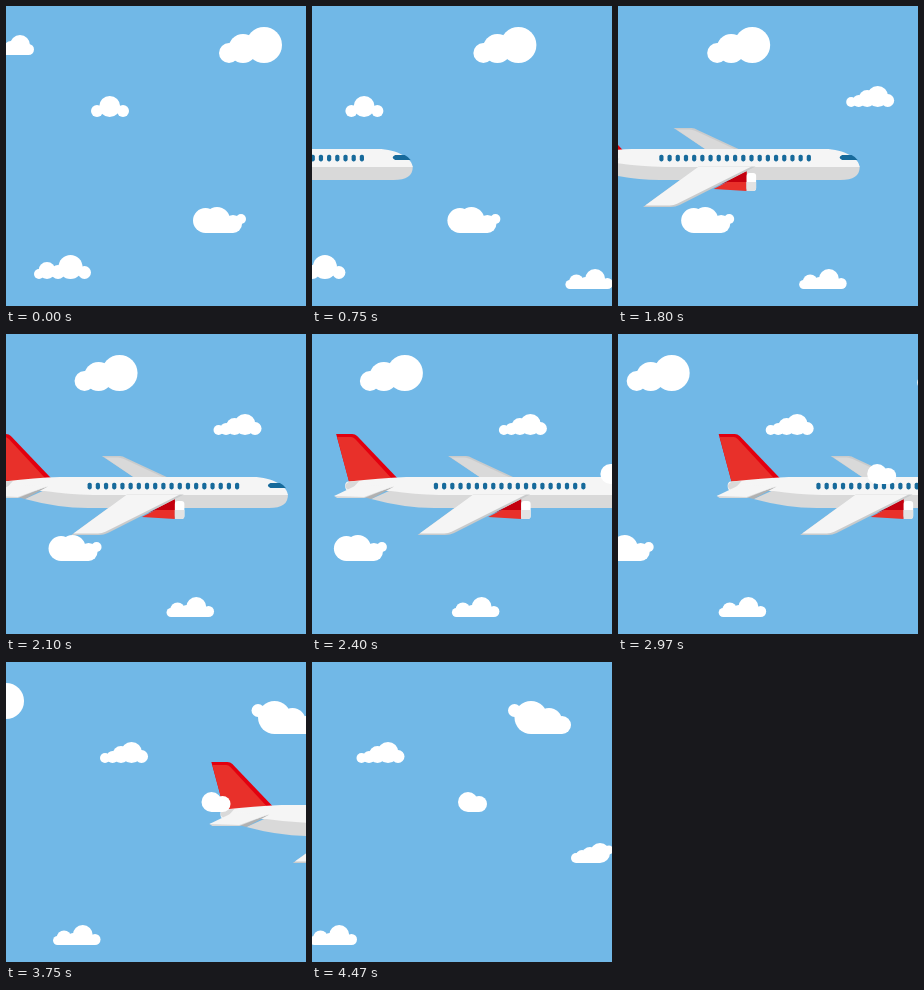
Recreate the animation shown at these times as an HTML page. Size 300x300 px, loop 4.5 s.

```html
<!DOCTYPE html>
<html lang="en">
<head>
<meta charset="utf-8">
<title>Plane and clouds</title>
<style>
  html, body { margin: 0; width: 100%; height: 100%; overflow: hidden; background: #71b8e7; }
  svg { display: block; width: 100%; height: 100%; }
  .white { fill: #f5f5f5; }
  .grey { fill: #d9d9d9; }
  .edge { fill: #c9cbcc; }
  .red { fill: #e8302a; }
  .crimson { fill: #e2000f; }
  .blue { fill: #176a9b; }
  .shade { fill: #b1b1b1; }
  .dark { fill: #c4000f; }
</style>
</head>
<body>
<svg viewBox="0 0 300 300">
  <g id="plane">
    <!-- far wing -->
    <path class="edge" d="M114 122H132Q135 122 138 124L181 144H147Z"/>
    <path class="grey" d="M117 123.5H130Q133 123.5 136 125L177 144H147Z"/>
    <!-- fin -->
    <path class="crimson" d="M2 100H18Q21 100 23 102L64 145 15 148Z"/>
    <path class="red" d="M3 103H17Q19 103 21 105L58 145 15 148Z"/>
    <!-- fuselage -->
    <path class="grey" d="M37 165 57 156 300 160Q301 174 281 174H100Q70 174 37 165Z"/>
    <path class="white" d="M15 147.5Q45 144 72 143H265C285 143 300 153 300 161H105Q80 160.5 57 157H15Q11 157 11 152T15 147.5Z"/>
    <path class="grey" d="M15 147.5 25 147 17 156H14Q8 152 15 147.5Z"/>
    <!-- tailplane -->
    <path class="shade" d="M29 163 60 152.500 37 165Z"/>
    <path class="grey" d="M0 162 60 152 30 164H3Z"/>
    <path class="white" d="M0 162 24 150.5 60 152 30 163Z"/>
    <!-- cockpit and windows -->
    <path class="blue" d="M282.5 149H292Q296 151 298 154H282.5Q277.500 151.5 282.5 149Z"/>
    <g id="windows" class="blue"></g>
    <!-- engine -->
    <path class="red" d="M154 183 187 166V185Z"/>
    <path class="dark" d="M160 179 187 165V176H168Z"/>
    <rect x="187" y="167" width="9.5" height="18" rx="3" fill="#fff"/>
    <path fill="#e3e3e3" d="M187 176h9.5v6q0 3-3 3H187Z"/>
    <!-- near wing -->
    <path class="edge" d="M139 160.5H196L120 199Q116 201 111 201H83.5Z"/>
    <path class="white" d="M139 160.5H192L118 197.5Q114 199.5 110 199.5H85.5Z"/>
  </g>
  <g id="clouds" fill="#fff"></g>
</svg>
<script>
const FRAMES = 150, FRAME_MS = 30;
const PLANE_TRAVEL = 600, CLOUD_TRAVEL = 307.5;

const byId = id => document.getElementById(id);
const plane = byId("plane"), sky = byId("clouds"), windows = byId("windows");

const rect = (x, y, w, h, r = 0) => `<rect x="${x}" y="${y}" width="${w}" height="${h}" rx="${r}"/>`;

function puff(x, y, r) {
  sky.innerHTML += `<circle cx="${x}" cy="${y}" r="${r}"/>`;
}

// Puffs given as "x radius" all rest on the line y = bottom.
function cloud(bottom, text) {
  const puffs = text.split(", ").map(pair => pair.split(" ").map(Number));
  puffs.forEach(([x, r]) => puff(x, bottom - r, r));
  return { left: puffs[0][0], right: puffs.at(-1)[0], bottom };
}

function flatCloud(bottom, text) {
  const { left, right } = cloud(bottom, text);
  sky.innerHTML += rect(left, bottom - 6, right - left, 6);
}

flatCloud(49, "-2 5, 5 7, 14 10, 22.5 5.5");
cloud(111, "91 6, 103.7 10.5, 117 6");
flatCloud(227, "199.5 12.5, 211 13, 227 9");
puff(235, 213, 5);
cloud(273, "33 5, 41 8.5, 52 7, 64.5 12, 78.5 6.5");
cloud(57, "223 10, 237 14.5, 258 18");
cloud(101, "357 5, 364.5 6, 373 8.5, 383.5 10.5, 393.5 6.5");
flatCloud(283, "309.5 4.5, 316 7.3, 325 6, 334.7 10, 347 5.5");
flatCloud(150, "463.5 10, 474.5 8");
flatCloud(72, "526.5 16.5, 544.5 13, 557.5 9");
puff(510, 48.5, 6.5);
flatCloud(201, "571.5 5, 577.5 6.5, 585.5 8, 595.5 10");
puff(604.5, 188, 4.5);

for (let i = 0; i < 19; i++) windows.innerHTML += rect(99.7 + i * 8.19, 148.8, 4.2, 6.6, 1.8);

function draw() {
  const frame = Math.floor(performance.now() / FRAME_MS) % FRAMES;
  const progress = frame / (FRAMES - 1);
  plane.setAttribute("transform", `translate(${PLANE_TRAVEL * progress - 300})`);
  sky.setAttribute("transform", `translate(${-CLOUD_TRAVEL * progress})`);
  requestAnimationFrame(draw);
}
draw();
</script>
</body>
</html>
```
